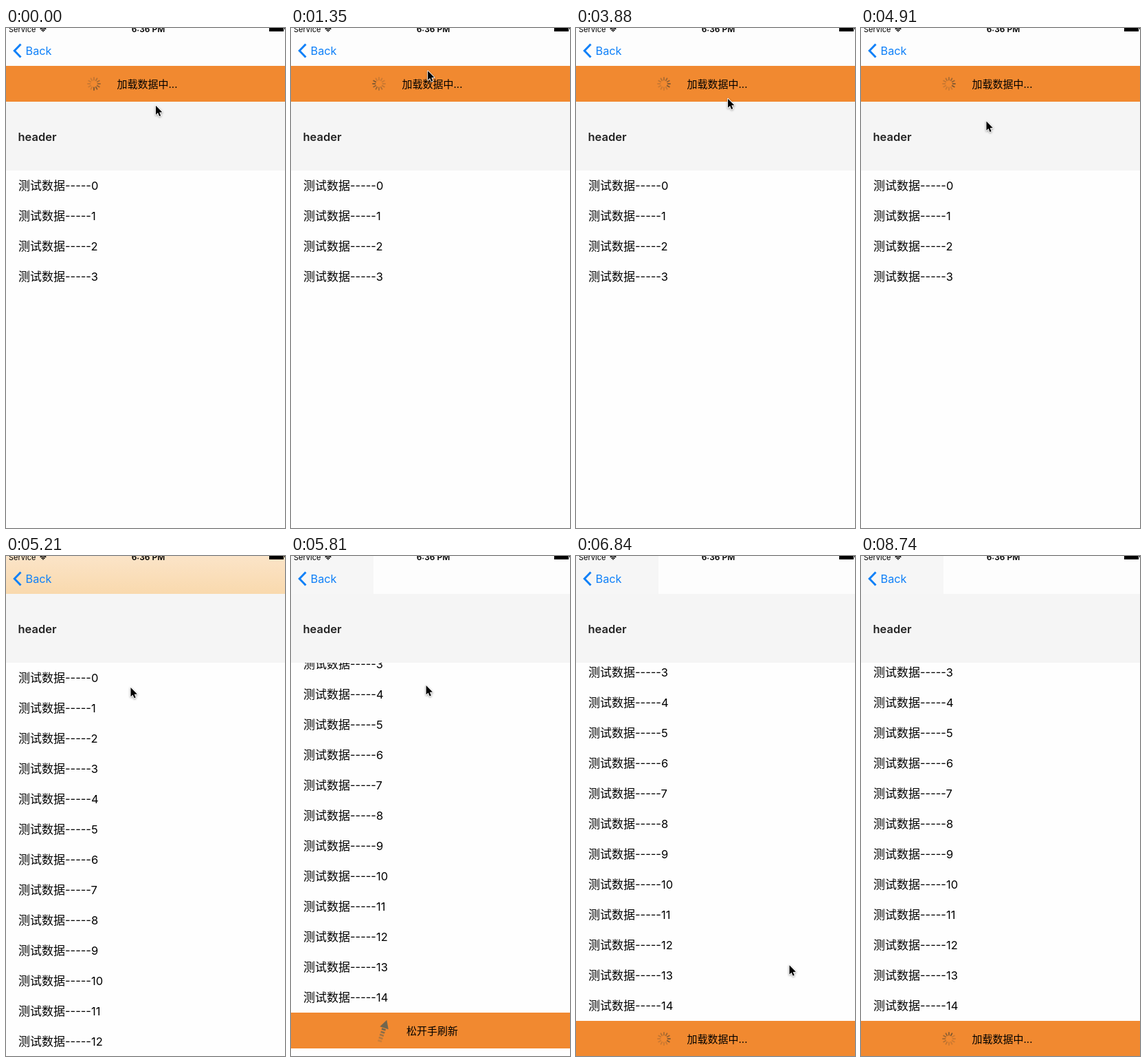
Recreate the animation shown at these times as an HTML page with a canvas. Size 406x726 px, loop 8.84 s.

```html
<!DOCTYPE html>
<html lang="zh">
<head>
<meta charset="utf-8">
<style>
html, body { margin: 0; width: 100%; height: 100%; overflow: hidden; background: #fefefe; }
canvas { display: block; }
</style>
</head>
<body>
<canvas id="stage" width="406" height="726"></canvas>
<script>
const ctx = document.getElementById('stage').getContext('2d');
const W = 406, H = 726, LOOP = 8840, STEP = 148.5;
const NAV = 55, BAR = 52, HEADER = 100, ROW = 44;
const LOADED = 5000, DRAG = 5530, RELEASED = 6020;
const ORANGE = '#f18930', BLUE = '#0f80f8';
const FONT = 'Inter, "Noto Sans CJK SC", "Noto Sans CJK", sans-serif';

const clamp = v => Math.max(0, Math.min(1, v));
const smooth = p => p * p * (3 - 2 * p);
const easeOut = p => 1 - (1 - p) ** 3;
const ramp = (t, start, length, ease = smooth) => ease(clamp((t - start) / length));

// The list closes its top bar, is dragged past its end, then springs back.
const scrollAt = t => Math.round(
  -BAR + BAR * ramp(t, LOADED, 190)
  + 160 * ramp(t, DRAG, 430, easeOut)
  - 20 * ramp(t, RELEASED, 280));

// Stops of the pointer: time, x, y.
const STOPS = [
  [0, 217, 113], [600, 247, 66], [1050, 203, 60], [2830, 177, 71],
  [4000, 226, 106], [4910, 182, 135], [5210, 181, 191], [5360, 190, 400],
  [DRAG, 190, 400], [5800, 196, 187], [6840, 310, 594], [7330, 350, 496], [7850, 326, 750]
];

function pointerAt(t) {
  const next = STOPS.findIndex(stop => stop[0] > t);
  if (next < 0) return [0, H + 50];
  const [t0, x0, y0] = STOPS[next - 1], [t1, x1, y1] = STOPS[next];
  const p = (t - t0) / (t1 - t0);
  return [x0 + (x1 - x0) * p, y0 + (y1 - y0) * p];
}

function rect(x, y, w, h, color) {
  ctx.fillStyle = color;
  ctx.fillRect(x, y, w, h);
}

function text(str, x, y, size, color = '#000', weight = 400, align = 'left') {
  ctx.font = `${weight} ${size}px ${FONT}`;
  ctx.textAlign = align;
  ctx.fillStyle = color;
  ctx.fillText(str, x, y);
}

function spinner(x, y, t) {
  const head = Math.floor(t / 1000 * 12) + 6;
  ctx.save();
  ctx.translate(x, y);
  ctx.lineWidth = 1.8;
  ctx.lineCap = 'round';
  for (let i = 0; i < 12; i++) {
    const age = (head - i + 12) % 12;
    ctx.strokeStyle = `rgba(95,75,50,${Math.max(0.25, 0.8 - age * 0.08)})`;
    ctx.beginPath();
    ctx.moveTo(0, -5.5);
    ctx.lineTo(0, -9);
    ctx.stroke();
    ctx.rotate(Math.PI / 6);
  }
  ctx.restore();
}

function loadingBar(y, t) {
  rect(0, y, W, BAR, ORANGE);
  spinner(128, y + 26, t);
  text('加载数据中...', 161.5, y + 32, 15);
}

function arrow(x, y, angle) {
  ctx.save();
  ctx.translate(x, y);
  ctx.rotate(angle);
  ctx.fillStyle = '#70664f';
  ctx.beginPath();
  ctx.moveTo(0, -17);
  ctx.lineTo(6.5, -5);
  ctx.lineTo(-6.5, -5);
  ctx.fill();
  for (let i = 0; i < 5; i++) {
    ctx.globalAlpha = 1 - i * 0.18;
    ctx.fillRect(-3, -4 + i * 4.4, 6, 2.6);
  }
  ctx.restore();
}

function pullBar(y, t) {
  const turn = ramp(t, 5742, 300);
  rect(0, y, W, BAR, ORANGE);
  arrow(134, y + 27, turn * Math.PI);
  text(turn > 0 ? '松开手刷新' : '上拉可刷新', 168, y + 32, 15);
}

function list(offset, t) {
  const count = t < LOADED ? 4 : 15;
  const top = NAV + HEADER - offset;
  for (let i = 0; i < count; i++) {
    const y = top + i * ROW + 28;
    text('测试数据', 18, y, 17);
    text('-----' + i, 86, y, 16.5);
  }
  const footer = t < RELEASED ? pullBar : loadingBar;
  if (t >= LOADED) footer(top + count * ROW, t);
}

function sectionHeader(offset) {
  const y = NAV + Math.max(0, -offset);
  rect(0, 0, W, y + HEADER, '#f5f5f5');
  text('header', 17.5, y + 57, 16.5, '#222', 600);
}

function statusBar() {
  text('Service', 4, 6, 11);
  text('6:36 PM', 207, 6, 12, '#000', 600, 'center');
  ctx.strokeStyle = '#000';
  ctx.lineWidth = 1.6;
  for (const r of [1, 3.4, 6]) {
    ctx.beginPath();
    ctx.arc(54, 6, r, -Math.PI * 0.75, -Math.PI * 0.25);
    ctx.stroke();
  }
  rect(383, 0, 21, 5, '#000');
  rect(405, 0, 1, 2, '#000');
}

function navBar(offset) {
  rect(0, 0, W, NAV, '#fdfdfd');
  if (offset > 0) rect(0, 0, 120, NAV, '#f6f6f6');

  // The orange bar shows through while it passes behind.
  const tint = ctx.createLinearGradient(0, 0, 0, NAV);
  tint.addColorStop(0, '#fbe4c8');
  tint.addColorStop(1, '#f9d9ad');
  ctx.globalAlpha = clamp(1 - Math.abs(offset) / BAR);
  rect(0, 0, W, NAV, tint);
  ctx.globalAlpha = 1;

  statusBar();
  ctx.strokeStyle = BLUE;
  ctx.lineWidth = 3;
  ctx.beginPath();
  ctx.moveTo(21.5, 23.5);
  ctx.lineTo(12.3, 33);
  ctx.lineTo(21.5, 42.5);
  ctx.stroke();
  text('Back', 28.5, 39, 16.3, BLUE);
}

function pointer([x, y]) {
  ctx.save();
  ctx.translate(x + 0.5, y + 0.5);
  ctx.scale(0.88, 0.88);
  const shape = new Path2D('M0 0V15L3.4 11.8 5.8 17.4 8.2 16.4 5.9 11 10.6 10.8Z');
  ctx.lineJoin = 'round';
  ctx.lineWidth = 2;
  ctx.strokeStyle = '#fff';
  ctx.shadowColor = 'rgba(0,0,0,.4)';
  ctx.shadowBlur = 3;
  ctx.shadowOffsetY = 1;
  ctx.stroke(shape);
  ctx.shadowColor = 'transparent';
  ctx.fillStyle = '#000';
  ctx.fill(shape);
  ctx.restore();
}

function draw(t) {
  const offset = scrollAt(t);
  rect(0, 0, W, H, '#fefefe');
  list(offset, t);
  sectionHeader(offset);
  if (offset < 0) loadingBar(NAV - BAR - offset, t);
  navBar(offset);
  pointer(pointerAt(t));
}

// Each picture is held for one step, like a screen recording.
function tick() {
  const t = performance.now() % LOOP;
  draw(Math.floor(t / STEP) * STEP + 10);
  requestAnimationFrame(tick);
}
tick();
</script>
</body>
</html>
```
